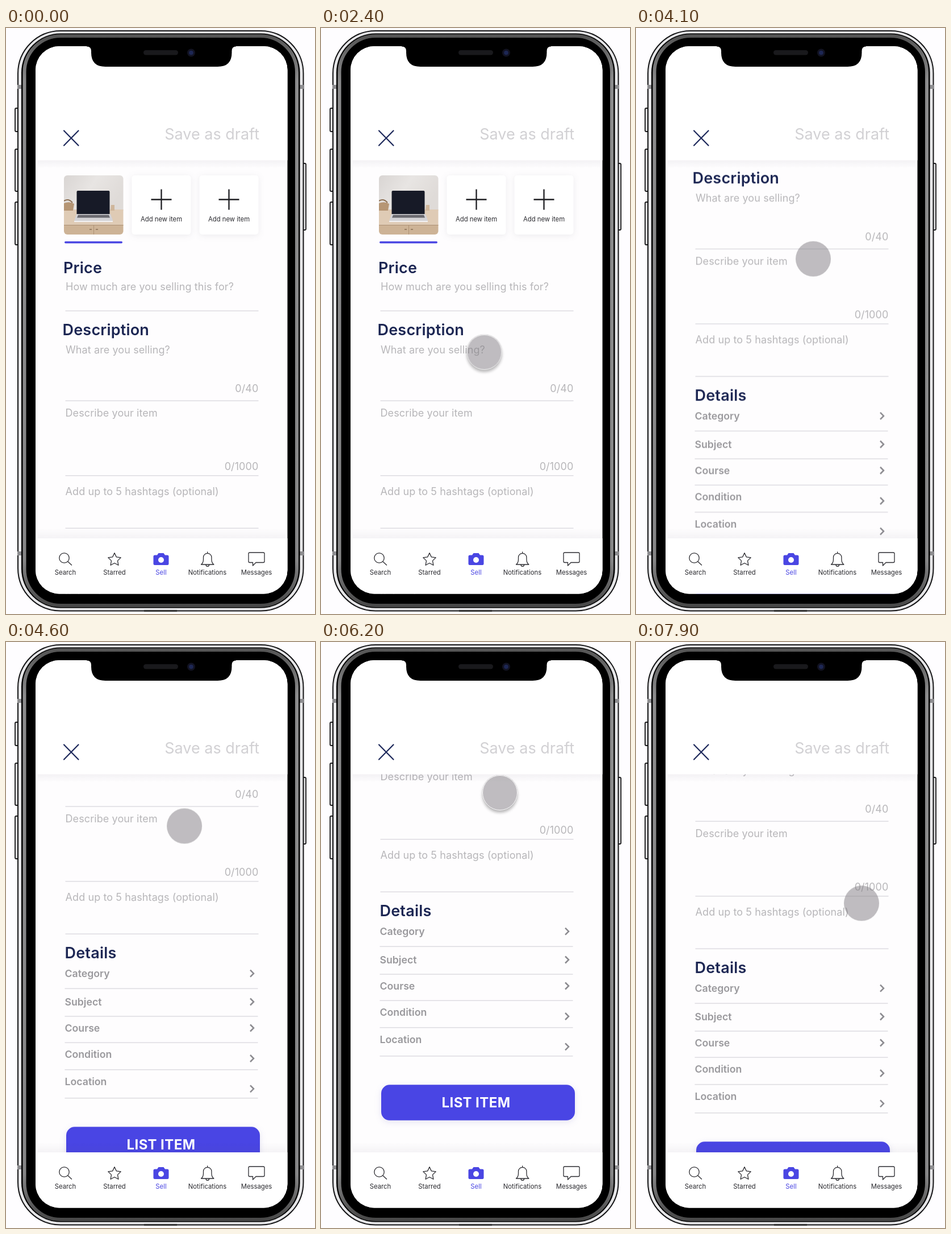
Animation, 544 px wide and 1030 px high, one loop 8000 ms. Source, as an HTML page:

```html
<!DOCTYPE html>
<html lang="en">
<head>
<meta charset="utf-8">
<title>Sell form scroll</title>
<style>
  html, body { margin: 0; width: 100%; height: 100%; overflow: hidden; background: #fefdff; }
  body { position: relative; }
  svg { position: absolute; left: 0; top: 0; display: block; }
  text { font-family: Inter, Roboto, sans-serif; }

  .draft { font-size: 27px; fill: #d2d1d4; }
  .title { font-size: 27px; font-weight: 600; fill: #1c2653; letter-spacing: .2px; }
  .hint { font-size: 18px; fill: #b7b6b9; letter-spacing: .1px; }
  .row { font-size: 17.7px; font-weight: 600; fill: #99989c; }
  .small { font-size: 11.3px; fill: #2b2b30; text-anchor: middle; }
  .action { font-size: 24px; font-weight: 700; fill: #fff; letter-spacing: .4px; text-anchor: middle; }
  .end { text-anchor: end; }
  .rule { stroke: #dddce1; stroke-width: 1.6; fill: none; }
  .icon { stroke: #2b2b30; stroke-width: 1.3; fill: none; stroke-linejoin: round; stroke-linecap: round; }
  .card { fill: #fff; filter: drop-shadow(0 2px 6px rgba(60, 55, 80, .09)); }
  .button { fill: #4945e4; filter: drop-shadow(0 3px 6px rgba(60, 55, 160, .13)); }

  #form { animation: scroll 8s infinite; }
  #cursor { position: absolute; left: -31px; top: -31px; width: 62px; height: 62px; animation: move 8s infinite; }
  #cursor i { position: absolute; inset: 0; border-radius: 50%; }
  .disc { background: rgba(128, 125, 129, .5); }
  .lift {
    box-sizing: border-box; border: 1.2px solid rgba(255, 255, 255, .95);
    box-shadow: 0 0 1px rgba(0, 0, 0, .3), 0 4px 5px rgba(0, 0, 0, .27);
    animation: lift 8s linear infinite;
  }

  @keyframes scroll {
    0%, 38.125% { transform: translateY(0); animation-timing-function: cubic-bezier(.5, 0, .85, .4); }
    42.5% { transform: translateY(-26.6px); animation-timing-function: cubic-bezier(.33, .26, .67, .74); }
    51.25% { transform: translateY(-266.5px); animation-timing-function: cubic-bezier(.33, .56, .67, .82); }
    62.5% { transform: translateY(-410px); animation-timing-function: cubic-bezier(.33, .65, .67, 1); }
    71.25% { transform: translateY(-440px); }
    89% { transform: translateY(-440px); animation-timing-function: cubic-bezier(.45, 0, .75, .6); }
    98.75% { transform: translateY(-340.3px); animation-timing-function: linear; }
    100% { transform: translateY(-320px); }
  }
  @keyframes move {
    0%, 8.125% { transform: translate(590px, 506px); animation-timing-function: cubic-bezier(.33, .36, .67, .72); }
    13.75% { transform: translate(404px, 517px); animation-timing-function: cubic-bezier(.33, .47, .67, 1); }
    20% { transform: translate(284px, 550px); }
    28% { transform: translate(284px, 550px); animation-timing-function: ease-in-out; }
    36.25% { transform: translate(312px, 711px); }
    38.125% { transform: translate(312px, 711px); animation-timing-function: cubic-bezier(.33, 0, .67, .62); }
    42.5% { transform: translate(312px, 611.5px); animation-timing-function: cubic-bezier(.33, .37, .67, .76); }
    51.25% { transform: translate(312px, 406px); animation-timing-function: cubic-bezier(.33, .53, .67, .85); }
    62.5% { transform: translate(315px, 287.5px); animation-timing-function: cubic-bezier(.33, .63, .67, 1); }
    71.25% { transform: translate(315px, 265px); }
    82.5% { transform: translate(315px, 265px); animation-timing-function: ease-in-out; }
    87.5% { transform: translate(392px, 290px); }
    88.5% { transform: translate(392px, 290px); animation-timing-function: cubic-bezier(.4, 0, .7, .7); }
    98.75% { transform: translate(397px, 459px); animation-timing-function: linear; }
    100% { transform: translate(398px, 480px); }
  }
  @keyframes lift {
    0%, 36.4% { opacity: 1; }
    37.6%, 71.3% { opacity: 0; }
    72.5%, 87.5% { opacity: 1; }
    88.5%, 100% { opacity: 0; }
  }
</style>
</head>
<body>
<svg width="544" height="1030" viewBox="0 0 544 1030">
  <defs>
    <clipPath id="screen"><rect x="52" y="32" width="443.5" height="962.5" rx="42"/></clipPath>
    <clipPath id="photo"><rect x="102" y="259" width="104.5" height="104" rx="6"/></clipPath>
    <linearGradient id="down" x2="0" y2="1">
      <stop stop-color="#555068" stop-opacity=".065"/><stop offset="1" stop-color="#555068" stop-opacity="0"/>
    </linearGradient>
    <linearGradient id="up" y1="1" x2="0" y2="0">
      <stop stop-color="#555068" stop-opacity=".055"/><stop offset="1" stop-color="#555068" stop-opacity="0"/>
    </linearGradient>
    <linearGradient id="wall" x2="1" y2=".4">
      <stop stop-color="#d9d5d3"/><stop offset=".5" stop-color="#e8e5e3"/><stop offset="1" stop-color="#dfdbd8"/>
    </linearGradient>
    <linearGradient id="metal" x2="0" y2="1">
      <stop stop-color="#555"/><stop offset=".08" stop-color="#8b8b8c"/>
      <stop offset=".92" stop-color="#858586"/><stop offset="1" stop-color="#484848"/>
    </linearGradient>
    <g id="add">
      <rect class="card" x="-52" y="259" width="104" height="104" rx="5"/>
      <path d="M-18 301.5H18M0 283.5V319.5" stroke="#1e1e22" stroke-width="2.3"/>
      <text class="small" y="339.5">Add new item</text>
    </g>
    <path id="chevron" d="M430 -6L436 0L430 6" fill="none" stroke="#8b8a8f" stroke-width="2.5"/>
  </defs>

  <!-- Phone body -->
  <g fill="#e4e4e6" stroke="#19191b" stroke-width="1.8">
    <rect x="16" y="141" width="8" height="41" rx="2"/>
    <rect x="16" y="213" width="8" height="74" rx="2"/>
    <rect x="16" y="306" width="8" height="75" rx="2"/>
    <rect x="520" y="238" width="8" height="117" rx="2"/>
  </g>
  <rect x="21" y="5" width="502.5" height="1019.5" rx="75" fill="#e6e6e8" stroke="#151517" stroke-width="2"/>
  <path d="M20 103.5h8M20 923.5h8M516 103.5h8M516 923.5h8" stroke="#8e8e91" stroke-width="7"/>
  <path d="M243 1024.5h58" stroke="#333" stroke-width="3"/>
  <rect x="27" y="9.5" width="490.5" height="1010" rx="69"/>
  <rect x="32.5" y="14" width="479.5" height="1001" rx="64" fill="none" stroke="url(#metal)" stroke-width="6"/>
  <rect x="37" y="18" width="470.5" height="992.5" rx="59"/>

  <g clip-path="url(#screen)">
    <rect x="52" y="32" width="444" height="963" fill="#fefdfe"/>

    <g id="form">
      <g clip-path="url(#photo)">
        <rect x="102" y="259" width="105" height="62" fill="url(#wall)"/>
        <rect x="102" y="319" width="105" height="28" fill="#dfcbb5"/>
        <rect x="102" y="346" width="105" height="18" fill="#cdb396"/>
        <path d="M102 346.5h105M154.500 347v17" stroke="#ad9175"/>
        <path d="M147 354h4m7 0h4" stroke="#8b7056" stroke-width="1.5"/>
        <path d="M102 308q10-4 18 1l-2 12h-16z" fill="#b69675"/>
        <path d="M102 304q8-5 15 3" stroke="#8d7054" stroke-width="2" fill="none"/>
        <path d="M184 321l1-10h6v10z" fill="#cfb69b"/>
        <path d="M124.500 327V288q0-2 2-2h54q2 0 2 2v39z" fill="#171a27"/>
        <path d="M124 327h60l4 11q0 3-3 3h-62q-3 0-2.500-3z" fill="#d4d3d6"/>
        <path d="M127 328.500h54l2 5h-58z" fill="#6b6a70"/>
        <path d="M120 340h68" stroke="#f2f1f2" stroke-width="2"/>
      </g>
      <rect x="103" y="375" width="102" height="3.5" rx="1.7" fill="#4a46e3"/>
      <use href="#add" x="273.500"/>
      <use href="#add" x="392.500"/>

      <text class="title" x="101" y="431">Price</text>
      <text class="hint" x="105" y="460.500">How much are you selling this for?</text>
      <text class="title" x="99.500" y="540">Description</text>
      <text class="hint" x="105" y="572">What are you selling?</text>
      <text class="hint end" x="444.500" y="639.500">0/40</text>
      <text class="hint" x="104.500" y="682.500">Describe your item</text>
      <text class="hint end" x="444.500" y="777">0/1000</text>
      <text class="hint" x="104.500" y="821">Add up to 5 hashtags (optional)</text>
      <path class="rule" d="M104.500 497.300h340M104.500 655.300h340M104.500 786.700h340M104.500 879.300h340"/>

      <text class="title" x="103.500" y="921.500">Details</text>
      <g class="row">
        <text x="103.500" y="955">Category</text>
        <text x="103.500" y="1004.500">Subject</text>
        <text x="103.500" y="1050.500">Course</text>
        <text x="103.500" y="1097">Condition</text>
        <text x="103.500" y="1144.500">Location</text>
      </g>
      <path class="rule" d="M103.500 975.300h340M103.500 1024h340M103.500 1070.200h340M103.500 1117.700h340M103.500 1167.700h340"/>
      <use href="#chevron" y="948.700"/>
      <use href="#chevron" y="998.500"/>
      <use href="#chevron" y="1044.500"/>
      <use href="#chevron" y="1098"/>
      <use href="#chevron" y="1151.300"/>
      <rect class="button" x="106" y="1218.300" width="341" height="62.500" rx="15"/>
      <text class="action" x="273" y="1257.700">LIST ITEM</text>
    </g>

    <!-- Header -->
    <rect x="52" y="32" width="444" height="200.500" fill="#fff"/>
    <rect x="56" y="232.500" width="436" height="14" fill="url(#down)"/>
    <path d="M102 180.500L127.500 206.500M127.500 180.500L102 206.500" stroke="#1f2a5c" stroke-width="2.2" stroke-linecap="round"/>
    <text class="draft end" x="446" y="195.500">Save as draft</text>

    <!-- Tab bar -->
    <rect x="56" y="879" width="436" height="18" fill="url(#up)"/>
    <rect x="52" y="897" width="444" height="98" fill="#fff"/>
    <g class="icon">
      <circle cx="102.500" cy="931.500" r="8.700"/>
      <path d="M109 938l6.500 6"/>
      <path d="M191 922.700l3.400 7.200 7.800 1-5.700 5.500 1.400 7.900-6.900-3.800-6.900 3.800 1.400-7.900-5.700-5.500 7.800-1z"/>
      <path d="M343.500 943q4-3 4-9v-3.500a7.200 7.200 0 0 1 14.400 0v3.500q0 6 4 9zM352 943.500a2.800 2.800 0 0 0 5.600 0M354.700 921v2"/>
      <path d="M429 922h24q2 0 2 2v13.500q0 2-2 2h-13l-5.500 5.500v-5.500h-5.500q-2 0-2-2V924q0-2 2-2z"/>
    </g>
    <path d="M262 926.500h4l2.500-3.500h9l2.500 3.500h4q2.500 0 2.500 2.500v12.500q0 2.500-2.500 2.500h-22q-2.500 0-2.500-2.500V929q0-2.500 2.500-2.500z" fill="#4a46e3"/>
    <circle cx="273" cy="935" r="5" fill="#fff"/>
    <g class="small">
      <text x="104.500" y="961">Search</text>
      <text x="191" y="961">Starred</text>
      <text x="273" y="961" fill="#4a46e3">Sell</text>
      <text x="354.500" y="961">Notifications</text>
      <text x="441" y="961">Messages</text>
    </g>
  </g>

  <!-- Notch -->
  <path d="M142 31h263v1.500q-7.500 0-7.500 8v3q0 24.500-25 24.500h-197.500q-25 0-25-24.500v-3q0-8-8-8z"/>
  <rect x="242" y="39" width="61" height="8.500" rx="4.200" fill="#19191c"/>
  <circle cx="326" cy="43.500" r="7" fill="#121322"/>
  <circle cx="326" cy="43.500" r="3.800" fill="#1d2754"/>
</svg>
<div id="cursor"><i class="disc"></i><i class="lift"></i></div>
</body>
</html>
```
